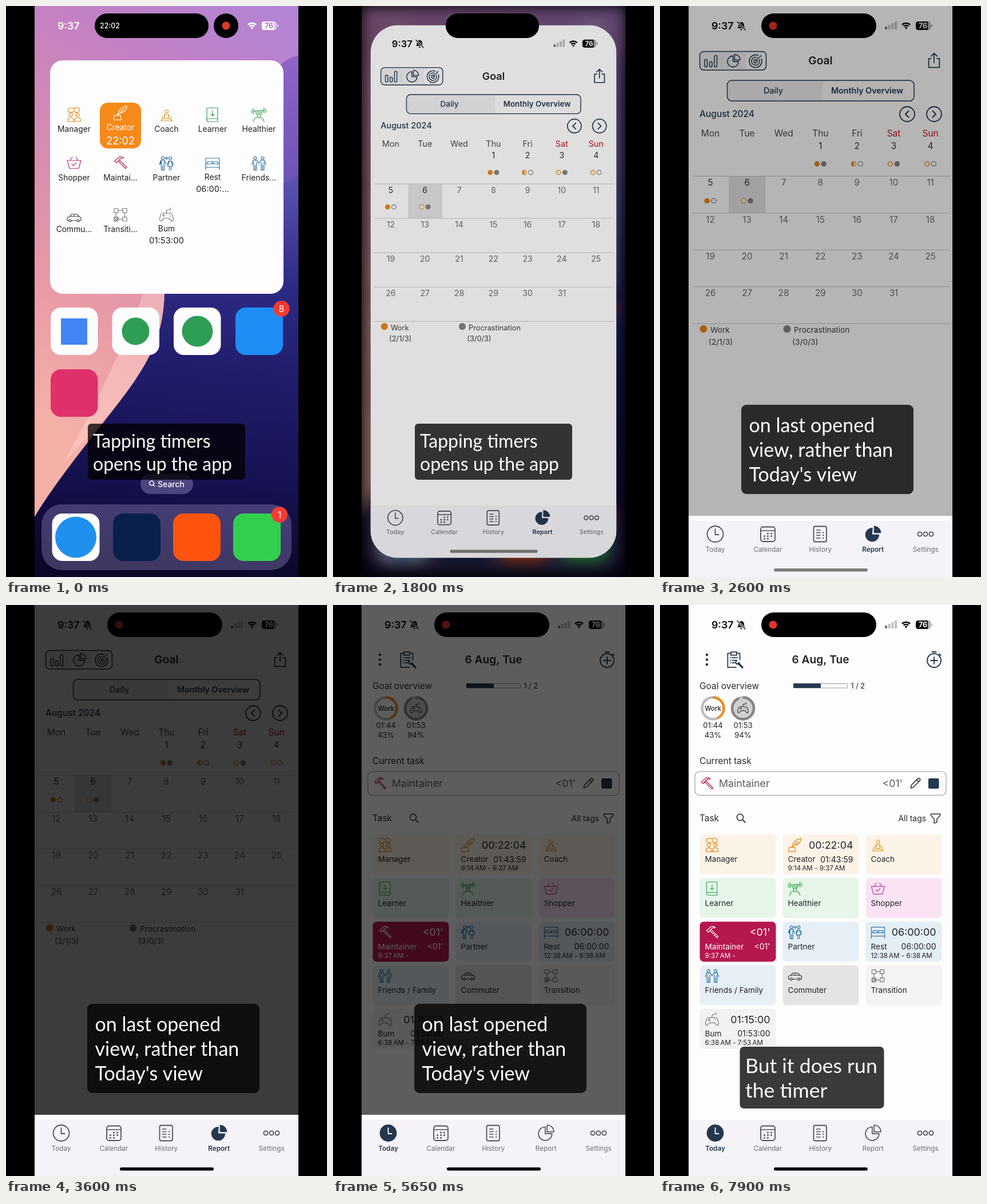
An HTML page with a canvas that plays this animation: 561 px wide and 998 px high, repeating every 7950 ms.

```html
<!DOCTYPE html>
<html lang="en">
<head>
<meta charset="utf-8">
<title>Timer widget demo</title>
<style>
html, body { margin: 0; width: 100%; height: 100%; overflow: hidden; background: #000; }
canvas { display: block; width: 100vw; height: 100vh; }
</style>
</head>
<body>
<canvas id="stage" width="561" height="998"></canvas>
<script>
const W = 561, H = 998, LOOP = 7950;
const screen = document.getElementById('stage').getContext('2d');
const homeLayer = document.createElement('canvas');
homeLayer.width = W;
homeLayer.height = H;
let c = screen;

const NAVY = '#24384f', INK = '#222226', GRAY = '#6c6c70', ORANGE = '#e8871a';
const clamp = v => Math.max(0, Math.min(1, v));
const mix = (a, b, k) => a + (b - a) * k;
const ramp = (t, a, b) => clamp((t - a) / (b - a));
const smooth = k => k * k * (3 - 2 * k);

const ICONS = {
  manager: 'M2 5a6 4 0 1 1 12 0a6 4 0 1 1-12 0M13 2a5.5 4 0 1 1 1 6M4 13a3 3 0 1 1 6 0a3 3 0 1 1-6 0M16 13a3 3 0 1 1 6 0a3 3 0 1 1-6 0M2 25v-3q0-4 5-4t5 4v3M14 25v-3q0-4 5-4t5 4v3M2 25h22',
  creator: 'M8 16C9 8 15 3 24 1C24 7 20 12 13 13M7 18L19 6M2 17h11v3l1 2v3H1v-3l1-2z',
  coach: 'M10 7a3 3 0 1 1 6 0a3 3 0 1 1-6 0M10 12h6l2 4 4 3M10 12l-2 4-4 3M10 13v6M16 13v6M3 23q5-4 10-3q5-1 10 3q-5 2-10 0q-5 2-10 0z',
  learner: 'M5 1h17v24H6q-3 0-3-3V3q0-2 2-2M3 22q0-2 3-2h16M13 6v9M10 12l3 3 3-3',
  healthier: 'M1 4v7M4 2v10M22 1v9M25 3v6M4 7L22 5M11 8a2.5 2.5 0 1 1 5 0a2.5 2.5 0 1 1-5 0M7 7l3 6h6l4-7M10 13l1 5-5 1-3 6M16 13l-1 5 5 2 2 5M11 18h4',
  shopper: 'M1 9h24l-4 14H5zM6 9l4-6M20 9l-4-6M9 15l3 3 5-5',
  hammer: 'M9 10L22 23l2-2L11 8M3 10l8-7q5-2 8 2l-5 0-8 8z',
  couple: 'M4 4a2.5 2.5 0 1 1 5 0a2.5 2.5 0 1 1-5 0M17 4a2.5 2.5 0 1 1 5 0a2.5 2.5 0 1 1-5 0M4 16V9L2 15l-1-1 2-6h7l2 6M4 12v13h2.5v-8v8H9V10M17 9h5l3 6M17 9l-3 6M18 9l-3 9h9l-3-9M18 18v7M21 18v7M13 6l-2-2q0-2 2-1q2-1 2 1z',
  friends: 'M4 4a2.5 2.5 0 1 1 5 0a2.5 2.5 0 1 1-5 0M17 4a2.5 2.5 0 1 1 5 0a2.5 2.5 0 1 1-5 0M1 15l2-7h7l3 5 3-5h7l2 7M4 11v14h2.5v-9v9H9V11M17 11v14h2.5v-9v9H22V11',
  bed: 'M1 24V4h24v20M1 14h24M1 20h24M4 14v-4h8v4M14 14v-4h8v4',
  car: 'M4 19H1v-5l4-2 4-4h9l4 4 3 2v5h-3M8 19h10M5 12h17M13 8v4M4 19a2 2 0 1 1 4 0a2 2 0 1 1-4 0M18 19a2 2 0 1 1 4 0a2 2 0 1 1-4 0',
  transition: 'M2 2h7v7H2zM17 2h7v7h-7zM2 17h7v7H2zM17 17h7v7h-7zM9 5.5h8M5.5 9v8M20.5 9v8M9 20.5h8M2 20l3-3M2 24l7-7M5 24l4-4',
  gamepad: 'M6 10h14q3 0 5 10q0 4-3 4l-5-5H9l-5 5q-3 0-3-4q2-10 5-10zM13 10V6q0-2 4-2t3-3M8 12v4M6 14h4M18 12.5v.5M20 15v.5',
  pie: 'M12 3A11 11 0 1 0 23 14H12zM15 0V11H26A11 11 0 0 0 15 0',
  share: 'M8 10H4v15h18V10h-4M13 17V1M8 6l5-5 5 5',
  pencil: 'M4 22l1.5-6L18 3.5q2-2 4 0t0 4L9.5 20zM16 5.5l4 4',
  funnel: 'M3 4h20v3l-7 8v7l-6 2v-9L3 7z',
  clipboard: 'M8 3H3v22h13M17 3h5v10M8 1h9v5H8zM7 10h.5M10 10h8M7 14h.5M10 14h6M7 18h.5M10 18h4'
};

function icon(name, x, y, color, size = 26, width = 1.2, fill) {
  c.save();
  c.translate(x - size / 2, y - size / 2);
  c.scale(size / 26, size / 26);
  c.lineJoin = c.lineCap = 'round';
  const p = new Path2D(ICONS[name]);
  if (fill) { c.fillStyle = color; c.fill(p); }
  c.strokeStyle = color;
  c.lineWidth = width * 26 / size;
  c.stroke(p);
  c.restore();
}

// y is the middle of the capitals
function text(s, x, y, size, color = INK, align = 'left', weight = 400, family = 'Inter, sans-serif') {
  c.font = `${weight} ${size}px ${family}`;
  c.fillStyle = color;
  c.textAlign = align;
  c.textBaseline = 'alphabetic';
  c.fillText(s, x, y + size * 0.364);
}

function box(x, y, w, h, r, fill, stroke, width = 1.5) {
  c.beginPath();
  c.roundRect(x, y, w, h, r);
  if (fill) { c.fillStyle = fill; c.fill(); }
  if (stroke) { c.strokeStyle = stroke; c.lineWidth = width; c.stroke(); }
}

function disc(x, y, r, fill, stroke, width = 1.5) {
  c.beginPath();
  c.arc(x, y, r, 0, 7);
  if (fill) { c.fillStyle = fill; c.fill(); }
  if (stroke) { c.strokeStyle = stroke; c.lineWidth = width; c.stroke(); }
}

function line(color, width, ...pts) {
  c.beginPath();
  for (let i = 0; i < pts.length; i += 2) c.lineTo(pts[i], pts[i + 1]);
  c.strokeStyle = color;
  c.lineWidth = width;
  c.lineCap = c.lineJoin = 'round';
  c.stroke();
}

function arc(x, y, r, from, to, color, width) {
  c.beginPath();
  c.arc(x, y, r, from, to);
  c.strokeStyle = color;
  c.lineWidth = width;
  c.lineCap = 'butt';
  c.stroke();
}

function shape(d, fill) {
  c.fillStyle = fill;
  c.fill(new Path2D(d));
}

function gradient(x0, y0, x1, y1, ...colors) {
  const g = c.createLinearGradient(x0, y0, x1, y1);
  colors.forEach((col, i) => g.addColorStop(i / (colors.length - 1), col));
  return g;
}

function status(color, inner, rest) {
  text('9:37', 90, 34.5, 17.8, color, 'left', 600);
  [10, 6].forEach(r => arc(430, 40, r, -2.35, -0.79, color, 2.6));
  c.beginPath();
  c.moveTo(430, 41);
  c.arc(430, 40, 3.2, -2.35, -0.79);
  c.fillStyle = color;
  c.fill();
  box(447, 27, 26, 15, 4.5, rest);
  box(447, 27, 21, 15, [4.5, 1, 1, 4.5], color);
  box(474, 32, 2, 5, 1, rest);
  text('76', 459.5, 34.5, 12.5, inner, 'center', 700);
}

function wallpaper() {
  c.fillStyle = gradient(60, 720, 480, 0, '#f5b0a8', '#e89aa6', '#d68cb0', '#c481c4', '#b284d4');
  c.fillRect(50, 0, 461, H);
  shape('M511 86Q487 92 470 112V330H511z', gradient(0, 86, 0, 320, '#9264c6', '#6a53b6'));
  shape('M511 297Q420 340 340 420Q300 460 277 503C275 560 262 600 225 655S100 810 50 893V998H511z',
    gradient(400, 297, 330, 998, '#5a52b0', '#2f2b86', '#201c6a', '#171252', '#0a0729'));
  shape('M238 503H277C275 560 262 600 225 655S140 755 100 800Q160 690 200 600T238 503z', 'rgba(255,222,212,.38)');
}

function widgetItem(name, label, col, x, y, color, textY) {
  icon(name, x, y, color);
  text(label, x, textY, 13.8, col, 'center');
}

function home(t) {
  c.clearRect(0, 0, W, H);
  wallpaper();
  status('#fff', '#a873bf', 'rgba(255,255,255,.55)');
  box(77, 95, 408, 408, 22, '#fdfdfd');
  const xs = [119, 200, 280.5, 361, 442];
  const timer = '22:0' + (t < 600 ? 2 : 3);
  box(164, 169, 72, 80, 14, '#f58a1b');
  text(timer, 200, 235, 18.2, '#fff', 'center');
  [['manager', 'Manager', 190, ORANGE, 215], ['creator', 'Creator', 187, '#fff', 211.5], ['coach', 'Coach', 190, '#d9a02a', 215],
   ['learner', 'Learner', 190, '#3a9d58', 215], ['healthier', 'Healthier', 190, '#37a04f', 215],
   ['shopper', 'Shopper', 274, '#b5317c', 300], ['hammer', 'Maintai...', 274, '#a8284f', 300], ['couple', 'Partner', 275, '#2f6d9e', 300],
   ['bed', 'Rest', 275, '#2f74a8', 299], ['friends', 'Friends...', 275, '#2f6d9e', 300],
   ['car', 'Commu...', 369, '#444', 390], ['transition', 'Transiti...', 365, '#777', 390], ['gamepad', 'Bum', 365, '#777', 389]
  ].forEach(([name, label, y, color, ty], i) => widgetItem(name, label, i === 1 ? '#fff' : INK, xs[i % 5], y, color, ty));
  text('06:00:...', 361, 320, 14.6, INK, 'center');
  text('01:53:00', 280.5, 410, 14.9, INK, 'center');

  // plain stand-ins for the app icons
  [78, 185.5, 293].forEach(x => box(x, 527, 82.5, 83, 18, '#fdfdfd'));
  box(96, 546, 46, 46, 0, '#4285f4');
  disc(226.5, 568.5, 24, '#2f9e55');
  disc(334.5, 568.5, 27, '#2f9e55');
  box(401, 527, 83, 83, 18, '#1f8df5');
  box(78, 635, 82.5, 83, 18, '#e0306c');
  box(235, 818, 92, 35, 17.5, 'rgba(190,180,230,.32)');
  disc(254.5, 834, 3.8, null, '#fff', 1.6);
  line('#fff', 1.6, 257.5, 837, 260, 839.5);
  text('Search', 265, 835.5, 14, '#fff', 'left', 500);
  box(62, 871, 437, 115, 36, 'rgba(160,150,205,.34)');
  ['#fdfdfd', '#08204a', '#ff5310', '#32cf4f'].forEach((col, i) => box([80.5, 187, 292, 397][i], 887, 83, 83, 18, col));
  disc(122, 928.5, 36, '#2090ee');
  [[481.5, 529, '8'], [478, 889, '1']].forEach(([x, y, n]) => {
    disc(x, y, 14, '#f23c34');
    text(n, x, y, 16, '#fff', 'center');
  });
  return timer;
}

function island(t, k, timer) {
  if (k <= 0) {
    box(155, 13, 199, 43, 21.5, '#000');
    disc(384.5, 34.5, 21.5, '#000');
    disc(384.5, 34.5, 7, '#dc3a28');
    text(timer, 164, 34.5, 12.5, '#fff', 'left', 500);
    return;
  }
  const a = clamp(k * 2), b = clamp(k * 2 - 1);
  const x = mix(mix(155, 197, a), 177, b), right = mix(mix(406, 360, a), 378, b);
  box(x, 13, right - x, 43, 21.5, '#000');
  c.globalAlpha = b;
  disc(197.5, 34.5, 7, '#e03528');
  c.globalAlpha = 1;
}

function appStatus() {
  status('#0c0c0e', '#fff', '#a9a9ab');
  [5, 8, 11, 14].forEach((h, i) => box(393 + i * 5.7, 41 - h, 4, h, 1.2, i ? '#c0c0c2' : '#77777a'));
  c.save();
  c.translate(142, 34.5);
  shape('M-7 4.5h14c-2-2-2-4-2-6a5 5 0 0 0-10 0c0 2 0 4-2 6zM-2 6h4a2 2 0 0 1-4 0z', '#1a1a1c');
  line('#fdfdfd', 3.4, -7, -7, 7, 7.5);
  line('#1a1a1c', 1.5, -7, -7, 7, 7.5);
  c.restore();
}

function tabBar(today, barTone) {
  c.fillStyle = '#f5f3f8';
  c.fillRect(50, 900, 461, 98);
  const g = '#505054';
  disc(96.5, 923, 14, today && NAVY, today ? NAVY : g, 1.8);
  line(today ? '#fff' : g, 1.8, 96.5, 914, 96.5, 924, 102.5, 924);
  box(176, 910.5, 25, 25.5, 4, null, g, 1.8);
  line(g, 1.6, 176, 917, 201, 917);
  for (let i = 1; i < 8; i++) disc(182.5 + i % 3 * 6, 922 + Math.floor(i / 3) * 4.6, 1.5, g);
  box(268.5, 909.5, 22.5, 27, 3, null, g, 1.8);
  [916, 920.5, 925, 930].forEach((y, i) => {
    line(g, 1.6, 273.5, y, 280, y);
    if (i) line(g, 2.2, 285, y, 285.5, y);
  });
  icon('pie', 372, 923, today ? g : NAVY, 28, today ? 1.7 : 0.8, !today);
  [454, 464, 474].forEach(x => disc(x, 923, 3.6, null, g, 1.8));
  ['Today', 'Calendar', 'History', 'Report', 'Settings'].forEach((s, i) => {
    const on = i === (today ? 0 : 3);
    text(s, 96.5 + i * 91.9, 949.5, 11.7, on ? NAVY : GRAY, 'center', on ? 600 : 400);
  });
  box(199, 983, 164, 5.5, 2.8, barTone);
}

function marker(x, y, kind, color, pale) {
  disc(x, y, 4.1, kind === 'full' ? color : pale, color, 1.3);
  if (kind === 'half') {
    c.beginPath();
    c.arc(x, y, 4.1, Math.PI / 2, Math.PI * 1.5);
    c.fillStyle = color;
    c.fill();
  }
}

function goalView() {
  box(69.5, 79.5, 116, 32.5, 7, '#eeeef0', NAVY);
  box(150, 81, 34, 29.5, 6, '#fafafb');
  [[78, 13], [86.5, 9], [95, 20]].forEach(([x, h]) => box(x, 106.5 - h, 4.6, h, 2.2, null, NAVY, 1.5));
  line('#c9c9cc', 1, 108, 88, 108, 104);
  icon('pie', 128.5, 96, NAVY, 23, 1.6);
  [11, 7, 3].forEach(r => arc(167, 96.5, r, -0.45, 5.2, NAVY, 1.6));
  line(NAVY, 1.5, 167, 96.5, 177, 86.5);
  text('Goal', 280.5, 95.5, 19.2, INK, 'center', 600);
  icon('share', 479, 95, NAVY, 27, 1.8);
  box(117.5, 130, 326.5, 36, 8, '#eeeef0', NAVY);
  box(283, 131.5, 159.5, 33, 7, '#fafafb');
  text('Daily', 198, 148, 14.4, NAVY, 'center', 500);
  text('Monthly Overview', 362, 148, 14.3, NAVY, 'center', 600);
  text('August 2024', 69, 188, 15.5, NAVY, 'left', 500);
  [[432, 1], [479, -1]].forEach(([x, d]) => {
    disc(x, 189, 13, null, NAVY, 1.8);
    line(NAVY, 1.9, x + 2.5 * d, 183.5, x - 3 * d, 189, x + 2.5 * d, 194.5);
  });

  const colX = i => 88 + i * 64.1;
  c.fillStyle = '#e1e1e3';
  c.fillRect(120.5, 298, 64, 64);
  ['Mon', 'Tue', 'Wed', 'Thu', 'Fri', 'Sat', 'Sun'].forEach((d, i) =>
    text(d, colX(i), 222, 15.5, i > 4 ? '#c0161c' : '#4a4a4e', 'center'));
  for (let d = 1; d < 32; d++) {
    const n = d + 2, row = Math.floor(n / 7);
    text(d, colX(n % 7), row ? 244.2 + row * 64.4 : 244, 15.2, d < 7 ? '#303034' : GRAY, 'center');
  }
  for (let i = 0; i < 5; i++) line('#c6c6c8', 1, 57, 297.5 + i * 64.4, 505, 297.5 + i * 64.4);
  [['full', 'full'], ['half', ''], ['', 'full'], ['', ''], ['full', ''], ['', 'full']].forEach(([a, b], i) => {
    const x = colX((i + 3) % 7), y = i > 3 ? 340.5 : 276;
    marker(x - 5.9, y, a, ORANGE, '#fff1de');
    marker(x + 5.9, y, b, '#828286', '#fdfdfd');
  });
  [[76, ORANGE, 'Work', '(2/1/3)'], [222, '#828286', 'Procrastination', '(3/0/3)']].forEach(([x, col, a, b]) => {
    disc(x, 564.5, 6.5, col);
    text(a, x + 12, 566.5, 13.7, '#3c3c40');
    text(b, x + 9, 587, 13.7, '#3c3c40');
  });
}

const TILES = [
  ['Manager', 'manager', ORANGE, '#fcf3e7'],
  ['Creator', 'creator', ORANGE, '#fcf3e7', '00:22:04', '01:43:59', '9:14\u2009AM - 9:37\u2009AM'],
  ['Coach', 'coach', '#e0a02a', '#fcf3e7'],
  ['Learner', 'learner', '#3fae5f', '#e6f6e8'],
  ['Healthier', 'healthier', '#35a850', '#e6f6e8'],
  ['Shopper', 'shopper', '#c23b8e', '#fbe3f5'],
  ['Maintainer', 'hammer', '#fff', '#b5174f', "<01'", "<01'", '9:37\u2009AM -'],
  ['Partner', 'couple', '#2f78ac', '#e7eff6'],
  ['Rest', 'bed', '#2f78ac', '#e4eef5', '06:00:00', '06:00:00', '12:38\u2009AM - 6:38\u2009AM'],
  ['Friends / Family', 'friends', '#2f78ac', '#e7eff6'],
  ['Commuter', 'car', '#444', '#e4e4e5'],
  ['Transition', 'transition', '#777', '#f3f3f4'],
  ['Bum', 'gamepad', '#777', '#f2f2f3', '01:15:00', '01:53:00', '6:38\u2009AM - 7:53\u2009AM']
];

function tile([name, art, color, fill, big, total, span], i) {
  const x = 69.5 + i % 3 * 145, y = 401 + Math.floor(i / 3) * 76.2, ink = color === '#fff' ? '#fff' : INK;
  box(x, y, 133, 70, 7, fill);
  icon(art, x + 21.5, y + 18.5, color, 25, 1.25);
  text(name, x + 9, y + 43.5, 13.6, ink);
  if (!big) return;
  text(big, x + 123, y + 18.5, 17.9, ink, 'right');
  text(total, x + 123, y + 43.5, 14, ink, 'right');
  text(span, x + 9, y + 59, 11.6, ink);
}

function todayView() {
  [87, 95.5, 104].forEach(y => disc(82, y, 2.3, NAVY));
  icon('clipboard', 129.5, 95.5, NAVY, 29, 1.8);
  line(NAVY, 3.2, 137, 102, 144, 109);
  arc(135.5, 100, 3.2, 0, 4.6, NAVY, 2);
  text('6 Aug, Tue', 280.5, 95.5, 19.2, INK, 'center', 600);
  disc(479, 97, 12, null, NAVY, 1.9);
  line(NAVY, 1.9, 473, 97, 485, 97);
  line(NAVY, 1.9, 479, 91, 479, 103);
  line(NAVY, 2, 475.5, 82, 482.5, 82);
  line(NAVY, 2, 488, 85.5, 490.5, 88);

  text('Goal overview', 69, 141.5, 15.5, '#2c2c30');
  box(233.5, 137.5, 94, 7.5, 1, '#fdfdfd', '#9a9a9e', 1);
  box(233, 137, 48, 8, 1, NAVY);
  text('1 / 2', 333.5, 141.5, 12.6);
  const top = -Math.PI / 2, turn = Math.PI * 2;
  arc(92.5, 180.5, 19, 0, turn, '#bcbcbe', 4.4);
  arc(92.5, 180.5, 19, top, top + turn * 0.43, '#f08c1e', 4.4);
  text('Work', 92.5, 181, 11.4, INK, 'center', 500);
  disc(145, 180.5, 19, '#d0d0d2');
  arc(145, 180.5, 19, 0, turn, '#bcbcbe', 4.4);
  arc(145, 180.5, 19, top, top + turn * 0.94, '#858588', 4.4);
  icon('gamepad', 145, 180, '#333', 20, 1.1);
  [[92.5, '01:44', '43%'], [145, '01:53', '94%']].forEach(([x, a, b]) => {
    text(a, x, 210.5, 13.1, INK, 'center');
    text(b, x, 227, 13.2, INK, 'center');
  });

  text('Current task', 69, 272, 15.6, '#2c2c30');
  box(61, 291, 439, 41.5, 8, '#fdfdfd', '#98989c', 1.1);
  icon('hammer', 82, 312, '#b5174f', 25, 1.3);
  text('Maintainer', 103, 312, 17.8, '#5c5c60');
  text("<01'", 424, 312, 17.8, '#5c5c60', 'right');
  icon('pencil', 446, 312, '#333', 23, 1.5);
  box(469, 303, 18.5, 18, 2.5, NAVY);

  text('Task', 69, 372.5, 15.4, '#2c2c30');
  disc(140, 371, 5.6, null, '#333', 1.6);
  line('#333', 1.8, 144.5, 375.5, 149, 380);
  text('All tags', 416.5, 372.5, 13.9, '#2c2c30');
  icon('funnel', 481.5, 372.5, '#333', 21, 1.5);
  TILES.forEach(tile);
}

function app(t) {
  const today = t >= 3750;
  c.fillStyle = '#fdfdfd';
  c.fillRect(50, 0, 461, H);
  appStatus();
  (today ? todayView : goalView)();
  const tone = Math.round(mix(125, 0, ramp(t, 3350, 3600)));
  tabBar(today, `rgb(${tone},${tone},${tone})`);
}

function launch(t, k) {
  const grow = clamp(k * 2), pop = 1 - (1 - grow) ** 3;
  const s = mix(0.887, 1, smooth(k ** 1.2));
  const w = 460.5 * s, h = mix(408, H * s, pop), mid = mix(299, 499, pop);
  c.save();
  c.beginPath();
  c.rect(50, 0, 461, H);
  c.clip();
  c.filter = `blur(${12 * grow}px)`;
  c.drawImage(homeLayer, 0, 0);
  c.filter = 'none';
  c.fillStyle = `rgba(0,0,0,${0.48 * grow})`;
  c.fillRect(50, 0, 461, H);
  c.globalAlpha = clamp(k * 4);
  c.beginPath();
  c.roundRect(280.5 - w / 2, mid - h / 2, w, h, k < 0.5 ? mix(22, 48, grow) : mix(48, 0, k * 2 - 1));
  c.clip();
  c.translate(280.5, mid);
  c.scale(s, s);
  c.translate(-280.5, -499);
  app(t);
  c.fillStyle = `rgba(0,0,0,${0.24 * (1 - k)})`;
  c.fillRect(0, 0, W, H);
  c.restore();
}

const CAPTIONS = [
  { until: 2150, rect: [143, 730, 275, 98, 6], x: 152, y: 772, size: 32, gap: 40, lines: ['Tapping timers', 'opens up the app'] },
  { until: 5950, rect: [142, 697, 301, 156, 9], x: 155.5, y: 745, size: 34, gap: 43, lines: ['on last opened', 'view, rather than', "Today's view"] },
  { until: LOOP, rect: [139.5, 772, 252, 108, 7], x: 149, y: 818, size: 35.6, gap: 43, lines: ['But it does run', 'the timer'] }
];

function caption(t) {
  const { rect, x, y, size, gap, lines } = CAPTIONS.find(o => t < o.until);
  box(...rect, 'rgba(0,0,0,.77)');
  lines.forEach((s, i) => text(s, x, y + i * gap - size * 0.364, size, '#fff', 'left', 400, 'Lato, sans-serif'));
}

function draw(t) {
  const k = ramp(t, 1500, 2100);
  c = homeLayer.getContext('2d');
  const timer = k < 1 ? home(t) : '';
  c = screen;
  c.fillStyle = '#000';
  c.fillRect(0, 0, W, H);
  if (k <= 0) c.drawImage(homeLayer, 0, 0);
  else if (k < 1) launch(t, k);
  else app(t);
  island(t, k, timer);
  const dim = 0.76 * (ramp(t, 2330, 3050) - ramp(t, 5550, 6150));
  if (dim > 0) {
    c.fillStyle = `rgba(0,0,0,${dim})`;
    c.fillRect(50, 0, 461, 891);
  }
  caption(t);
}

const start = performance.now();
function frame() {
  draw((performance.now() - start) % LOOP);
  requestAnimationFrame(frame);
}
frame();
</script>
</body>
</html>
```
